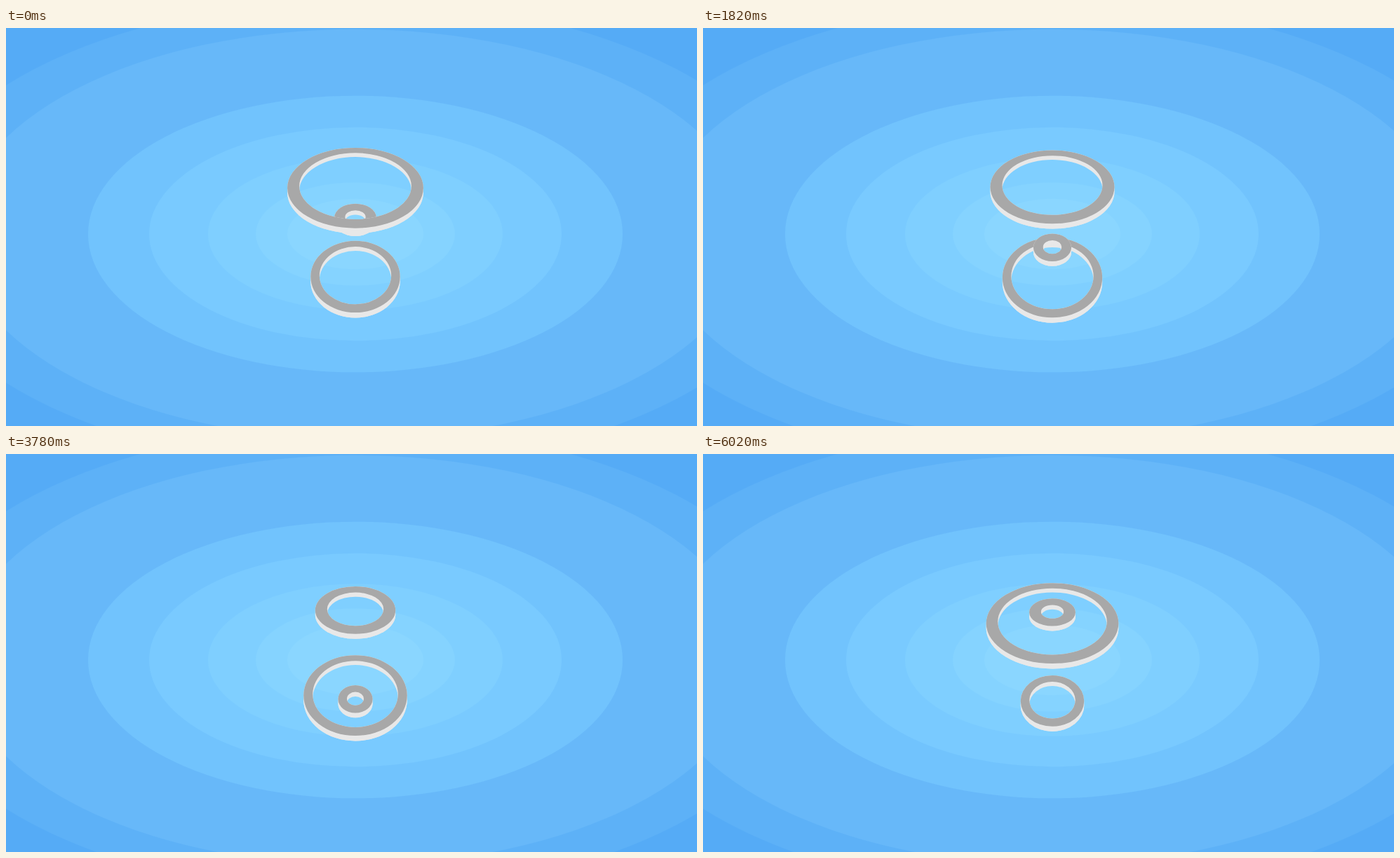
Animation of 985x568 px, one loop 6090 ms. Source, as an HTML page:

```html
<!DOCTYPE html>
<html lang="en">
<head>
<meta charset="utf-8">
<title>Flowing rings</title>
<style>
  html, body { margin: 0; width: 100%; height: 100%; overflow: hidden; background: #55abf6; }
  svg { display: block; width: 985px; height: 568px; }
</style>
</head>
<body>
<svg viewBox="0 0 985 568">
  <rect width="985" height="568" fill="#55abf6"/>
  <g id="glow"></g>
  <g id="rings" fill-rule="evenodd"></g>
</svg>
<script>
const LOOP = 6090, STEP = 70;
const CYCLE = 4740, LEG = CYCLE / 4, MOVE = 1110;
const START = 371;              // when the first ring begins to rise
const CX = 498;
const R_MIN = 33.3, R_MAX = 97, BAND = 17;
const TOP_Y = 220, DROP = 130, DEPTH = 0.357, TILT = 0.592;
const WALL = 6.5;

function add(parent, name, attrs) {
  const node = document.createElementNS('http://www.w3.org/2000/svg', name);
  for (const key in attrs) node.setAttribute(key, attrs[key]);
  parent.appendChild(node);
  return node;
}

// Backdrop: concentric flat ellipses, outermost first
const glow = document.getElementById('glow');
[
  [645, '#5db1f7'], [564, '#67b8f9'], [381, '#71c3fd'], [294, '#79caff'],
  [210, '#7fcfff'], [142, '#85d3ff'], [97, '#8ad6ff']
].forEach(([rx, fill]) => add(glow, 'ellipse', { cx: CX, cy: 294, rx, ry: rx * 0.518, fill }));

const layer = document.getElementById('rings');
const slots = [0, 1, 2].map(() => ({
  wall: add(layer, 'path', { fill: '#e8e8e8' }),
  skirt: add(layer, 'path', { fill: '#e8e8e8' }),
  face: add(layer, 'path', { fill: '#a8a8a8' })
}));

const ease = u => (1 - Math.cos(Math.PI * Math.min(1, Math.max(0, u)))) / 2;
const mix = (a, b, k) => a + (b - a) * k;

// Legs: rise while wide, shrink on top, sink while narrow, widen below
function ringState(time) {
  const t = ((time - START) % CYCLE + CYCLE) % CYCLE;
  const leg = Math.floor(t / LEG);
  const k = ease((t - leg * LEG) / MOVE);
  return [
    { depth: 1 - k, radius: R_MAX },
    { depth: 0, radius: mix(R_MAX, R_MIN, k) },
    { depth: k, radius: R_MIN },
    { depth: 1, radius: mix(R_MIN, R_MAX, k) }
  ][leg];
}

// Perspective view of a level circle
function project(radius, depth) {
  const zoom = 1 + DEPTH * depth;
  const base = TOP_Y + DROP * depth * (1 + DEPTH) / zoom;
  const bulge = mix(8.3, 6.2, depth) * (radius / R_MAX) ** 2;
  return { rx: radius / zoom, ry: radius * TILT, cy: base + bulge };
}

const lower = e => ({ rx: e.rx, ry: e.ry * 1.015, cy: e.cy + WALL });
const arc = (e, x) => `A${e.rx} ${e.ry} 0 0 1 ${x} ${e.cy}`;
const oval = e => `M${CX - e.rx} ${e.cy}${arc(e, CX + e.rx)}${arc(e, CX - e.rx)}Z`;
const hull = (a, b) =>
  `M${CX - a.rx} ${a.cy}${arc(a, CX + a.rx)}L${CX + b.rx} ${b.cy}${arc(b, CX - b.rx)}Z`;

function drawRing(slot, { radius, depth }) {
  const outer = project(radius, depth), inner = project(radius - BAND, depth);
  const outerLow = lower(outer), innerLow = lower(inner);
  slot.wall.setAttribute('d', oval(outerLow) + oval(innerLow));
  slot.skirt.setAttribute('d', hull(outer, outerLow) + oval(inner));
  slot.face.setAttribute('d', oval(outer) + oval(inner));
}

function render(ms) {
  const t = Math.floor((ms % LOOP) / STEP) * STEP;
  [0, 1, 2]
    .map(i => ringState(t + i * CYCLE / 3))
    .sort((a, b) => b.depth - a.depth)
    .forEach((state, i) => drawRing(slots[i], state));
}

let origin = null;
function tick(now) {
  if (origin === null) origin = now;
  render(now - origin);
  requestAnimationFrame(tick);
}
render(0);
requestAnimationFrame(tick);
</script>
</body>
</html>
```
